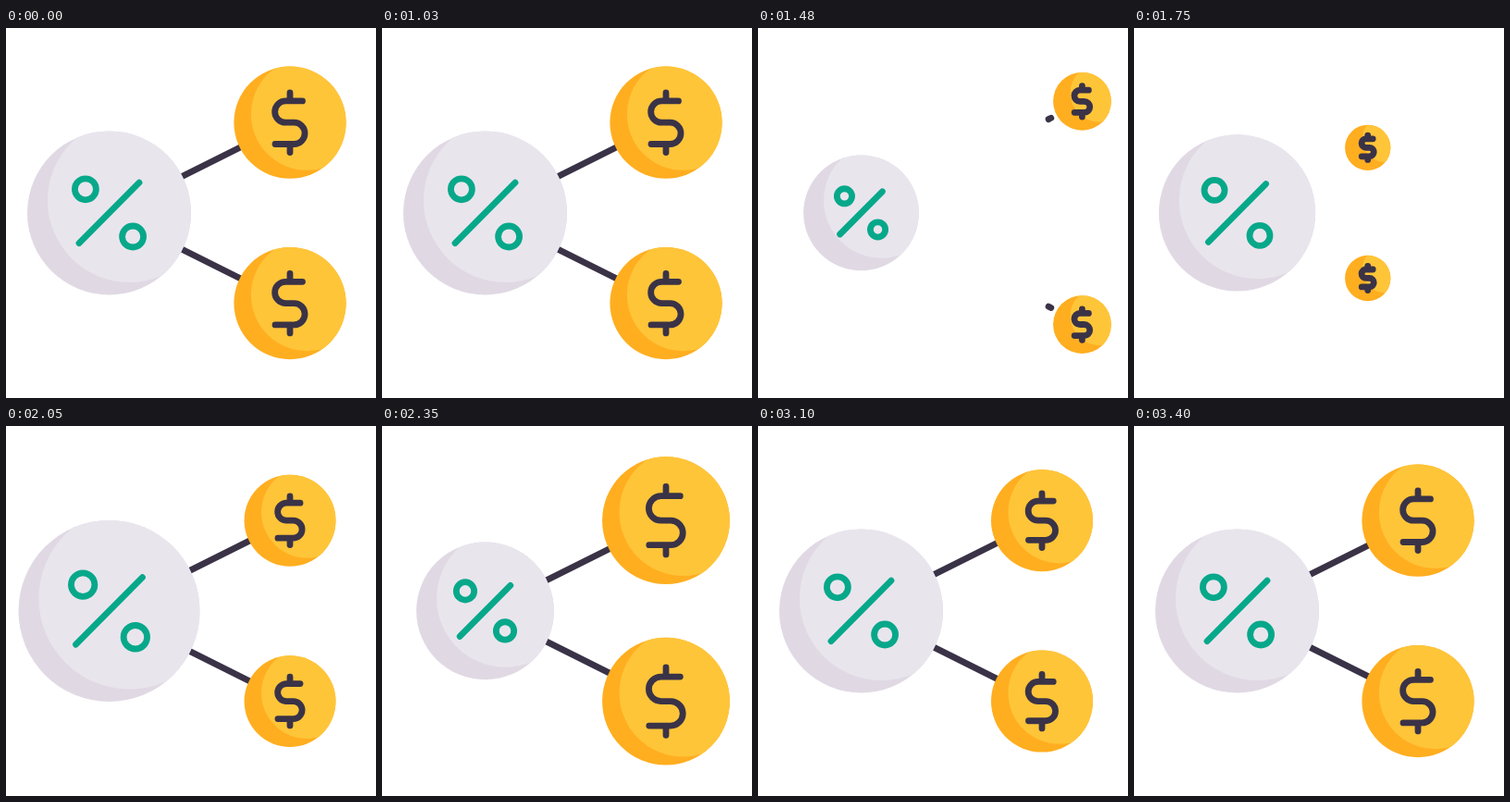
Animation, 400 px wide and 400 px high, one loop 3430 ms. Source, as an HTML page with a canvas:

```html
<!DOCTYPE html>
<html lang="en">
<head>
<meta charset="utf-8">
<title>Profit share</title>
<style>
  html, body { margin: 0; width: 100%; height: 100%; overflow: hidden; background: #fff; }
  canvas { display: block; width: 100vw; height: 100vh; }
</style>
</head>
<body>
<canvas id="stage" width="400" height="400"></canvas>
<script>
const ctx = document.getElementById('stage').getContext('2d');
const LOOP = 3430, TAU = Math.PI * 2, STROKE = 6.8;
const DARK = '#3a3347', TEAL = '#07a88a';
const HUB = { x: 111.5, y: 199.9, r: 88.5, fill: '#e9e5ed', shade: '#e0d9e4', dx: 22, dy: -13.5 };
const COIN = { r: 60.6, fill: '#ffc539', shade: '#ffae20', dx: 18.5, dy: -9 };
const REACH = { x: 195.5, y: 97.7 };
const OUT = 1030, SWAP = 1605;

// [time, scale] after the swap
const hubKeys = [[SWAP, .4], [1750, .955], [1960, 1.148], [2360, .84], [3060, 1]];
const coinKeys = [[SWAP, 0], [1750, .405], [2080, .85], [2350, 1.137], [2440, 1.152], [2830, .828], [3400, 1]];

const progress = (t, a, b) => Math.min(1, Math.max(0, (t - a) / (b - a)));
const easeIn = u => u ** 3;
const easeOut = u => 1 - (1 - u) ** 3;

// Monotone cubic through the keys, flat at every turning point
function track(keys, t) {
  const last = keys.length - 1;
  if (t >= keys[last][0]) return keys[last][1];
  const secant = i => (keys[i + 1][1] - keys[i][1]) / (keys[i + 1][0] - keys[i][0]);
  const slope = i => {
    if (i === last) return 0;
    if (i === 0) return secant(0) * 1.3;
    const a = secant(i - 1), b = secant(i);
    return a * b > 0 ? 2 * a * b / (a + b) : 0;
  };
  let i = 0;
  while (t >= keys[i + 1][0]) i++;
  const h = keys[i + 1][0] - keys[i][0], u = (t - keys[i][0]) / h, v = 1 - u;
  return keys[i][1] * (1 + 2 * u) * v * v + h * slope(i) * u * v * v
       + keys[i + 1][1] * u * u * (3 - 2 * u) - h * slope(i + 1) * u * u * v;
}

function pose(t) {
  if (t < SWAP) {
    const k = easeIn(progress(t, OUT, SWAP));
    return {
      hub: 1 - .612 * k,
      coin: 1 - k,
      x: REACH.x + 90 * k,
      y: REACH.y + 47.5 * k,
      from: 205.3 * easeIn(progress(t, OUT, 1483)),
      to: 205.3
    };
  }
  const k = easeOut(progress(t, SWAP, 2025));
  return {
    hub: track(hubKeys, t),
    coin: track(coinKeys, t),
    x: REACH.x * k,
    y: REACH.y * k,
    from: 0,
    to: REACH.x * easeOut(progress(t, 1740, 2110))
  };
}

function disc(x, y, r, fill) {
  ctx.beginPath();
  ctx.arc(x, y, r, 0, TAU);
  ctx.fillStyle = fill;
  ctx.fill();
}

// The lit part is the same disc, shifted by a fixed amount
function ball(style, x, y, scale, glyph) {
  const r = style.r * scale;
  if (r < .5) return;
  ctx.save();
  disc(x, y, r, style.shade);
  ctx.clip();
  disc(x + style.dx, y + style.dy, r, style.fill);
  ctx.translate(x, y);
  ctx.beginPath();
  glyph(scale);
  ctx.stroke();
  ctx.restore();
}

function percent(s) {
  ctx.strokeStyle = TEAL;
  for (const d of [-25.6 * s, 25.6 * s]) {
    ctx.moveTo(d + 11.5 * s, d);
    ctx.arc(d, d, 11.5 * s, 0, TAU);
  }
  ctx.moveTo(-32.5 * s, 32.8 * s);
  ctx.lineTo(32.5 * s, -32.8 * s);
}

function dollar(s) {
  const r = 11.65 * s, q = Math.PI / 2;
  ctx.strokeStyle = DARK;
  ctx.moveTo(13.5 * s, -2 * r);
  ctx.lineTo(-4.7 * s, -2 * r);
  ctx.arc(-4.7 * s, -r, r, -q, q, true);
  ctx.lineTo(4.4 * s, 0);
  ctx.arc(4.4 * s, r, r, -q, q);
  ctx.lineTo(-16 * s, 2 * r);
  for (const d of [-1, 1]) {
    ctx.moveTo(0, d * 32.3 * s);
    ctx.lineTo(0, d * 2 * r);
  }
}

function draw(t) {
  const p = pose(t), tilt = REACH.y / REACH.x;
  ctx.fillStyle = '#fff';
  ctx.fillRect(0, 0, 400, 400);
  ctx.lineWidth = STROKE;
  ctx.lineCap = ctx.lineJoin = 'round';
  for (const side of [-1, 1]) {
    if (p.to > p.from && p.from < 205) {
      ctx.strokeStyle = DARK;
      ctx.beginPath();
      ctx.moveTo(HUB.x + p.from, HUB.y + side * p.from * tilt);
      ctx.lineTo(HUB.x + p.to, HUB.y + side * p.to * tilt);
      ctx.stroke();
    }
    ball(COIN, HUB.x + p.x, HUB.y + side * p.y, p.coin, dollar);
  }
  ball(HUB, HUB.x, HUB.y, p.hub, percent);
}

const start = performance.now();
function tick() {
  draw((performance.now() - start) % LOOP);
  requestAnimationFrame(tick);
}
tick();
</script>
</body>
</html>
```
